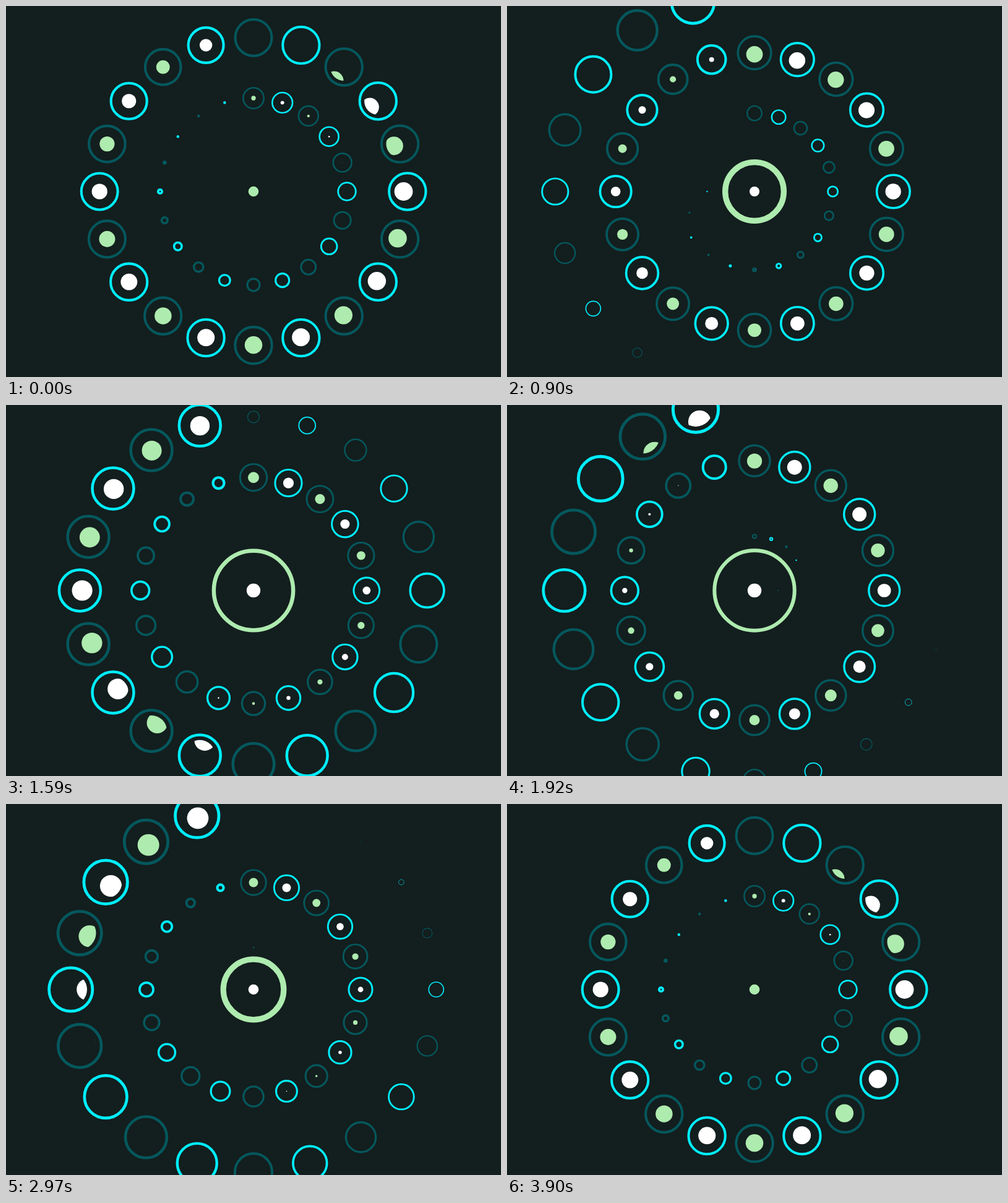
An HTML page with a canvas for the animation above (3930 ms loop, 800 by 600 pixels).

```html
<!DOCTYPE html>
<html lang="en">
<head>
<meta charset="utf-8">
<title>Ripple rings</title>
<style>
  html, body { margin: 0; width: 100%; height: 100%; overflow: hidden; background: #131e1e; }
  canvas { display: block; }
</style>
</head>
<body>
<canvas id="stage" width="800" height="600"></canvas>
<script>
const ctx = document.getElementById('stage').getContext('2d');
const COLORS = { bg: '#131e1e', cyan: '#00eeff', teal: '#04585d', green: '#aeebaf', white: '#ffffff' };
const LOOP = 3930, STEP = 30, CYCLE = 3900;
const BIRTHS = [847, 2047, 3247];
const COUNT = 20, SPEED = 0.0815, LIFE = 4400;
const CX = 400, CY = 300;

const clamp = v => Math.min(1, Math.max(0, v));
const smooth = v => { v = clamp(v); return v * v * (3 - 2 * v); };
const cubicOut = v => 1 - (1 - clamp(v)) ** 3;
const softSine = v => smooth(Math.sin(Math.PI / 2 * clamp(v)));

function disc(x, y, r, color) {
  if (r <= 0) return;
  ctx.beginPath();
  ctx.arc(x, y, r, 0, Math.PI * 2);
  ctx.fillStyle = color;
  ctx.fill();
}

// Ring given by its outer radius; a wide stroke closes it into a dot.
function ring(x, y, outer, width, color) {
  if (outer <= 0) return;
  const w = Math.min(width, outer);
  ctx.beginPath();
  ctx.arc(x, y, outer - w / 2, 0, Math.PI * 2);
  ctx.lineWidth = w;
  ctx.strokeStyle = color;
  ctx.stroke();
}

function drawChild(k, age) {
  const spread = smooth((age - 45.5 * k - 745) / 220);
  const shrink = softSine((3600 + 40 * k - age) / 690);
  const scale = spread * shrink;
  if (scale <= 0) return;

  const reach = SPEED * age;
  const angle = k * Math.PI * 2 / COUNT;
  const dx = Math.sin(angle), dy = -Math.cos(angle);
  const x = CX + dx * reach * spread, y = CY + dy * reach * spread;
  const odd = k % 2 === 1;

  const unit = 0.1275 * reach * scale;
  const grow = cubicOut((age - 57 * k - 832) / 1709);
  const width = (0.0163 + 0.012 * (1 - grow)) * reach * scale;
  ring(x, y, unit * Math.max(0.12, grow), width, odd ? COLORS.cyan : COLORS.teal);

  const fill = 0.473 * unit * cubicOut((age - 51 * k - 1625) / 1450);
  const slide = Math.exp((age - 45 * k - 2978) / 92.6);
  if (fill <= 0 || slide > 1.18) return;
  ctx.save();
  ctx.beginPath();
  ctx.arc(x, y, unit * 0.7, 0, Math.PI * 2);
  ctx.clip();
  disc(x - dx * slide * unit, y - dy * slide * unit, fill, odd ? COLORS.white : COLORS.green);
  ctx.restore();
}

function drawCore(t) {
  const half = CYCLE / 2;
  const p = softSine(1 - Math.abs(t - half) / half);
  const width = 9 + 3 * Math.cos(Math.PI * t / half);
  ring(CX, CY, 8.3 + 59.4 * p, width, COLORS.green);
  disc(CX, CY, 12.2 * (p - 0.08), COLORS.white);
}

function draw(t) {
  ctx.fillStyle = COLORS.bg;
  ctx.fillRect(0, 0, 800, 600);
  for (const birth of BIRTHS) {
    const first = (t - birth + CYCLE) % CYCLE;
    for (let age = first; age < LIFE; age += CYCLE) {
      for (let k = 0; k < COUNT; k++) drawChild(k, age);
    }
  }
  drawCore(t);
}

const start = performance.now();
function tick() {
  const t = (performance.now() - start) % LOOP;
  draw(Math.floor(t / STEP) * STEP % CYCLE);
  requestAnimationFrame(tick);
}
tick();
</script>
</body>
</html>
```
